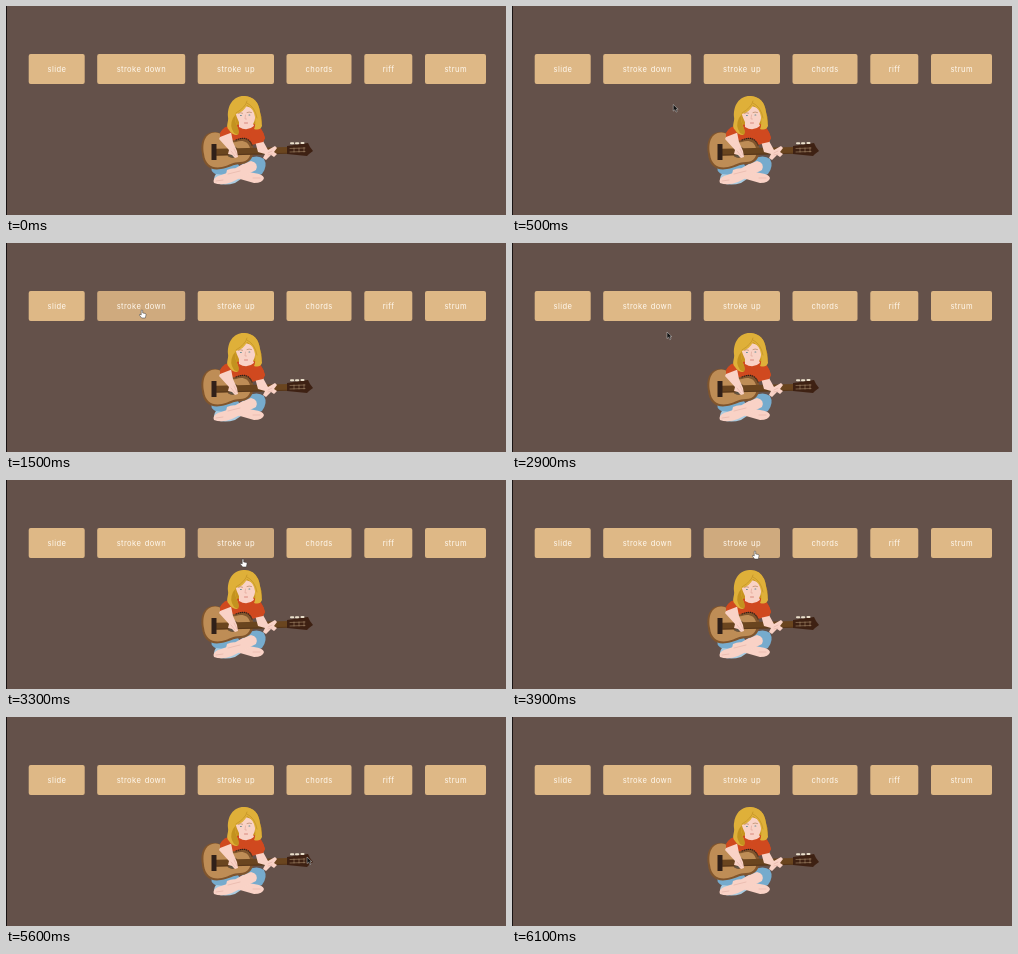
Recreate the animation shown at these times as an HTML page. Size 500 px wide and 209 px high, loop 6.7 s.

```html
<!DOCTYPE html>
<html lang="en">
<head>
<meta charset="utf-8">
<title>Guitar buttons</title>
<style>
html, body { margin: 0; width: 100%; height: 100%; overflow: hidden; background: #64514a; }
svg { display: block; width: 100vw; height: 100vh; }
text { font: 400 7.6px Inter, "Open Sans", sans-serif; letter-spacing: .4px; word-spacing: .9px; fill: #fff8ee; text-anchor: middle; }
.skin { fill: #f9d2c6; }
.shirt { fill: #d0491f; }
.jeans { fill: #76abcd; }
.line { fill: none; stroke-linecap: round; stroke-linejoin: round; }
</style>
</head>
<body>
<svg viewBox="0 0 500 209">
  <rect width="500" height="209" fill="#64514a"/>
  <rect width="1" height="209" fill="#191313"/>
  <g id="buttons"></g>

  <!-- back hair and torso -->
  <path fill="#c8941f" d="M238 90Q252 91 254 106Q258 116 253 126L236 124L224 118Q220 98 238 90Z"/>
  <path class="shirt" d="M214 127Q218 120 226 119L248 118Q256 120 259 132L257 136L246 139V146H222Z"/>
  <path class="skin" d="M233 114L246 115L248 120Q241 126 233 121Z"/>

  <!-- legs -->
  <path class="jeans" d="M206 160Q216 155 232 158L236 165L222 171L211 169Q203 165 206 160Z"/>
  <path class="jeans" d="M240 153Q252 148 258 153Q262 160 256 168L246 172L232 164Z"/>
  <path fill="#a9cbe0" d="M210 168Q206 173 210 177Q219 180 229 177L238 171Z"/>
  <path class="skin" d="M221 164Q229 160 236 165L248 167Q257 168 258 172Q257 177 248 177L234 173L220 168Z"/>
  <path class="skin" d="M245 155Q253 157 250 164L236 171L226 176Q216 180 208 177Q206 173 212 170L221 167L235 159Z"/>
  <path class="line" stroke="#dda99d" stroke-width=".5" d="M222 168L234 165M210 175L217 174M247 172L254 172"/>

  <!-- guitar -->
  <path fill="#80552d" d="M207 126C197 127 194 137 196 148C197 160 205 165 215 163C223 162 227 158 235 158C244 158 249 150 247 141C245 132 236 131 230 134C220 136 219 125 207 126Z"/>
  <path fill="#be8d56" d="M209 126.5C199 127 196 137 198 148C199 159 207 163 216 161C224 159 227 156 234 156C242 156 246 150 244 142C242 135 236 134 230 136C219 138 219 126 209 126.5Z"/>
  <path class="line" stroke="#2d2019" stroke-width="1.2" stroke-dasharray=".5 1.6" d="M230 134Q242 129 246 139"/>
  <circle cx="226.5" cy="146" r="6" fill="#6d533a"/>
  <circle cx="226.5" cy="146" r="4.6" fill="#53605f"/>
  <path fill="#6a451f" d="M210 142.8L283 141V147.8L210 149.8Z"/>
  <path class="line" stroke="#4b2d17" stroke-width=".6" d="M211 149L283 147.2"/>
  <path fill="#302019" d="M205.5 138H210.5V154H205.5Z"/>
  <path fill="#3e2113" d="M281 140L302 137L304 141L307 145L303 148L301 150L281 148Z"/>
  <path class="line" stroke="#eadfcb" stroke-width="2" d="M285 137.3H287.2M290 137.3H292.2M295.5 137H297.5"/>
  <path class="line" stroke="#b79a78" stroke-width=".5" d="M284 142.5L299 142M284 146L299 145.5M288 142V146M293 142V146M298 141.5V146"/>

  <!-- arms and hands -->
  <path class="skin" d="M215 129L225 126L227 136L231 145L232 151L229 152L226 149L222 148L223 144L213 133Z"/>
  <path class="line" stroke="#dda99d" stroke-width=".5" d="M225 145L229 150M228 143L231 149"/>
  <path class="skin" d="M249 135L257 135L262 144L269 140L271 142L268 146L271 148L268 151L265 149L260 154L257 152L259 148L252 146Z"/>
  <path class="line" stroke="#dda99d" stroke-width=".5" d="M262 147L266 145M262 149L266 148"/>
  <path class="shirt" d="M214 128Q216 122 223 120L227 126L214 131Z"/>
  <path class="shirt" d="M248 120Q256 120 259 132L257 136L248 138L243 128Z"/>

  <!-- face and front hair -->
  <path class="skin" d="M229 105Q238 96 248 104Q251 111 247 118Q243 122 238 121Q232 118 229 105Z"/>
  <path fill="#dfb039" d="M239 90C228 89 221 99 222 111C223 116 219 120 223 124Q226 129 231 129Q234 127 231 120Q228 112 230 108Q238 106 241 99Q248 103 249 111Q250 119 248 123Q254 125 256 120Q255 112 254 106Q252 91 239 90Z"/>
  <path fill="#c3921f" d="M227 112Q223 120 228 127L232 129Q234 126 231 120Q228 113 230 108Z"/>
  <path class="line" stroke="#bd8b23" stroke-width=".6" d="M241 95Q240 101 230 107M241 97Q249 101 251 112"/>
  <path class="line" stroke="#a97850" stroke-width=".6" d="M232.5 107.3Q234 106 236.5 107.2M241 106.5Q243 105.5 245.5 106.5"/>
  <path class="line" stroke="#658b95" stroke-width="1.1" d="M234.5 109.5H235.3M243 109H243.8"/>
  <path class="line" stroke="#dda394" stroke-width=".6" d="M239.5 109L239 113H240.5"/>
  <path class="line" stroke="#cf7468" stroke-width=".8" d="M238.5 117H241.5"/>

  <g id="pointer">
    <path id="arrow" fill="#111" stroke="#eee" stroke-width=".4" d="M0 0V6.6L1.6 5.2L2.8 7.6L4 7L2.9 4.7H4.9Z"/>
    <path id="hand" fill="#fff" stroke="#333" stroke-width=".5" d="M-.8 .4Q0 -.6 .7 .4V3L3.4 3.5Q4.3 3.8 4 5L3.3 8H-.3L-2.6 5.2Q-2.7 4.1-1.8 4.4L-.8 5Z"/>
  </g>
</svg>
<script>
const LOOP = 6700, STEP = 100;
const labels = [
  ["slide", 22.7, 56], ["stroke down", 91.2, 88], ["stroke up", 191.7, 76.3],
  ["chords", 280.5, 65], ["riff", 358.3, 48], ["strum", 419, 61]
];
// time, x, y of the pointer tip
const path = [
  [200, 492, 190], [600, 51, 68], [1100, 58, 70], [1200, 105, 68],
  [1500, 136, 67], [2800, 136, 67], [2900, 155, 89], [3300, 237, 79],
  [3500, 231, 68], [3900, 243, 71], [4300, 349, 96], [4500, 373, 71],
  [4700, 380, 68], [5500, 380, 68], [5600, 301, 140], [5700, 301, 140],
  [6000, 491, 185], [6100, 520, 190]
];
const byId = id => document.getElementById(id);
const show = (node, on) => node.style.display = on ? "" : "none";

function add(tag, attrs, content = "") {
  const node = document.createElementNS("http://www.w3.org/2000/svg", tag);
  for (const key in attrs) node.setAttribute(key, attrs[key]);
  node.textContent = content;
  return byId("buttons").appendChild(node);
}

const buttons = labels.map(([name, x, width]) => {
  const box = add("rect", { x, y: 48, width, height: 30, rx: 2 });
  add("text", { x: x + width / 2 + .2, y: 65.8 }, name);
  return { box, x, width };
});

function pointerAt(t) {
  const i = path.findIndex(p => p[0] > t);
  if (i < 1) return null;
  const [a, b] = [path[i - 1], path[i]];
  const k = (t - a[0]) / (b[0] - a[0]);
  return [a[1] + (b[1] - a[1]) * k, a[2] + (b[2] - a[2]) * k];
}

function draw(now) {
  const t = Math.floor(now % LOOP / STEP) * STEP;
  const tip = pointerAt(t);
  const inside = ({ x, width }, [px, py]) => px >= x && px <= x + width && py >= 48 && py <= 80;
  const hovered = tip && buttons.find(b => inside(b, tip));
  for (const b of buttons) b.box.setAttribute("fill", b === hovered ? "#cfaa7e" : "#deb886");
  show(byId("pointer"), tip);
  if (!tip) return;
  // The hand replaces the arrow one step after a button is entered.
  const last = pointerAt(t - STEP);
  const hand = hovered && last && (inside(hovered, last) || last[1] > 80);
  show(byId("hand"), hand);
  show(byId("arrow"), !hand);
  byId("pointer").setAttribute("transform", `translate(${tip})`);
}

const start = performance.now();
function tick() {
  draw(performance.now() - start);
  requestAnimationFrame(tick);
}
tick();
</script>
</body>
</html>
```
